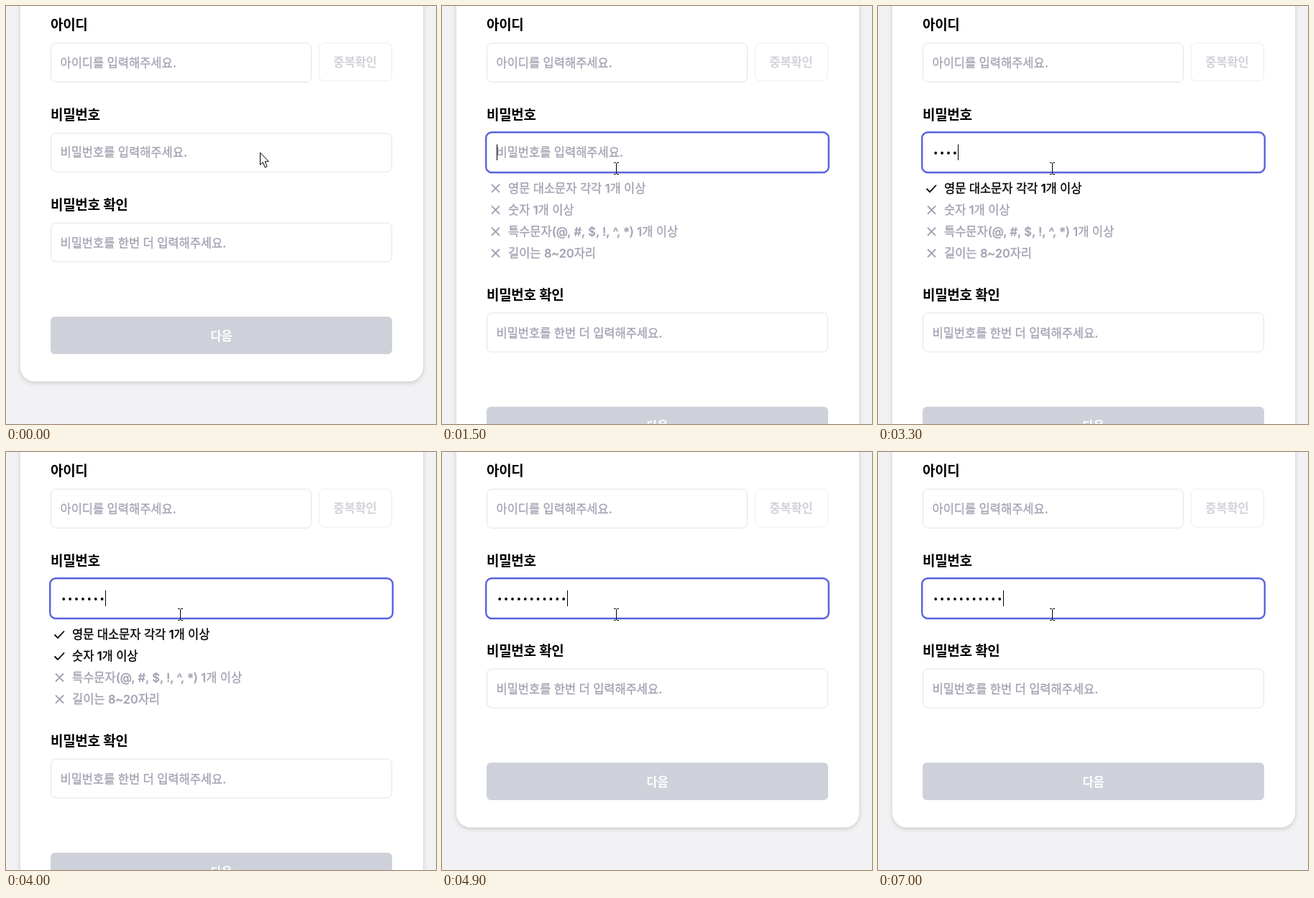
Animation, 598 px wide and 580 px high, one loop 7.3 s. Source, as an HTML page:

```html
<!DOCTYPE html>
<html lang="ko">
<head>
<meta charset="utf-8">
<style>
  html, body { margin: 0; width: 100%; height: 100%; overflow: hidden; background: #f2f2f4; }
  svg { display: block; width: 598px; height: 580px; }
  text { font: 500 16.5px Inter, "Noto Sans CJK KR", "Noto Sans CJK", sans-serif; }
  .label { font-size: 19px; font-weight: 600; letter-spacing: -.016em; }
  .hint { fill: #a2a1b2; stroke: #a2a1b2; stroke-width: .3; }
  .field { fill: #fff; stroke: #e2e3e8; }
  .button { font-weight: 600; text-anchor: middle; letter-spacing: -.005em; }
  .rule { color: #a2a1b2; }
  .rule.done { color: #000; }
  .rule text { fill: currentColor; stroke: currentColor; stroke-width: .35; }
  .rule path { fill: none; stroke: currentColor; stroke-width: 1.8; }
  .card { filter: drop-shadow(0 2px 3px #0000002b); }
</style>
</head>
<body>
<svg viewBox="0 0 598 580">
  <rect class="card" id="card" x="20" y="-60" width="560" height="581" rx="20" fill="#fff"/>

  <text class="label" x="62" y="33">아이디</text>
  <rect class="field" x="62.5" y="51.5" width="362" height="54" rx="7"/>
  <text class="hint" x="75.5" y="85">아이디를 입력해주세요.</text>
  <rect class="field" x="435.5" y="51.5" width="101" height="52.5" rx="7" style="stroke:#eeeef1"/>
  <text class="button" x="485.5" y="84" fill="#d2d2da">중복확인</text>

  <text class="label" x="62" y="158">비밀번호</text>
  <rect class="field" x="62.5" y="176.5" width="474" height="53.5" rx="7"/>
  <rect id="ring" x="61.2" y="175.2" width="476.6" height="55.8" rx="8" fill="#fff" stroke="#5a63de" stroke-width="2.4"/>
  <text class="hint" id="passwordHint" x="75.5" y="209">비밀번호를 입력해주세요.</text>
  <g id="dots"></g>
  <rect id="caret" y="192" width="1" height="22"/>

  <g id="rules"></g>

  <g id="lower">
    <text class="label" x="62" y="282.5">비밀번호 확인</text>
    <rect class="field" x="62.5" y="301" width="474" height="54" rx="7"/>
    <text class="hint" x="75.5" y="334.5">비밀번호를 한번 더 입력해주세요.</text>
    <rect x="62" y="431" width="475" height="52" rx="6" fill="#cfd1da"/>
    <text class="button" x="299.5" y="463.5" fill="#fff">다음</text>
  </g>

  <path id="arrow" d="M.5.5V17.5L4.3 13.8L7.2 21L10 19.8L7.1 12.8H12.3Z" fill="#fff" stroke="#000"/>
  <path id="beam" d="M-3.5-8H-1L0-7L1-8H3.5M0-7V7M-3.5 8H-1L0 7L1 8H3.5" fill="none" stroke="#000"/>
</svg>
<script>
const LOOP = 7300, TICK = 100;
const FOCUS = 1500, VALID = 4900, LIST_HEIGHT = 125;
const CROSS = "M69 -5.5l11 11m0 -11l-11 11", CHECK = "M67.5 .5l4.5 4.5l9 -9.5";

const RULES = [
  ["영문 대소문자 각각 1개 이상", 2800],
  ["숫자 1개 이상", 3600],
  ["특수문자(@, #, $, !, ^, *) 1개 이상", VALID],
  ["길이는 8~20자리", 4100],
];
// [time, characters typed]
const TYPING = [[2400, 1], [2800, 2], [3100, 3], [3300, 4], [3600, 5], [3800, 6],
  [4000, 7], [4100, 8], [4300, 10], [VALID, 11]];
const CARET_OFF = [[2200, 2400], [5100, 5700], [6300, 7000]];
// [time, x, y, shape]
const POINTER = [
  [0, 353, 203, "arrow"], [100, 360, 120, "arrow"], [200, 250, 25, "arrow"],
  [300, 110, 80, "beam"], [400, 79, 205, "beam"], [500, 170, 327, "beam"],
  [600, 300, 159, "arrow"], [1200, 285, 180, "beam"], [1300, 258, 208, "beam"],
  [1400, 242.5, 225.5, "beam"],
];

const el = id => document.getElementById(id);
const show = (node, on) => { node.style.display = on ? "" : "none"; };
const latest = (steps, t) => steps.filter(step => step[0] <= t).pop();
const add = (parent, tag, attributes) => {
  const node = document.createElementNS("http://www.w3.org/2000/svg", tag);
  for (const name in attributes) node.setAttribute(name, attributes[name]);
  return parent.appendChild(node);
};

const dots = Array.from({ length: 11 }, (_, i) =>
  add(el("dots"), "circle", { cx: 80.2 + 8.9 * i, cy: 204, r: 1.9 }));

const rules = RULES.map(([label, doneAt], i) => {
  const row = add(el("rules"), "g", { transform: `translate(0 ${253 + 30 * i})` });
  const icon = add(row, "path", {});
  add(row, "text", { x: 92, y: 6 }).textContent = label;
  return { row, icon, doneAt };
});

function draw(t) {
  const focused = t >= FOCUS, open = focused && t < VALID;
  const typed = (latest(TYPING, t) || [0, 0])[1];
  const shift = open ? LIST_HEIGHT : 0;

  el("card").setAttribute("height", 581 + shift);
  el("lower").setAttribute("transform", `translate(0 ${shift})`);
  show(el("ring"), focused);
  show(el("rules"), open);
  show(el("passwordHint"), !typed);

  dots.forEach((dot, i) => show(dot, i < typed));
  el("caret").setAttribute("x", Math.floor(76.2 + 8.9 * typed));
  show(el("caret"), focused && !CARET_OFF.some(([from, to]) => t >= from && t < to));

  for (const { row, icon, doneAt } of rules) {
    const done = t >= doneAt;
    row.setAttribute("class", done ? "rule done" : "rule");
    icon.setAttribute("d", done ? CHECK : CROSS);
  }

  const [, x, y, shape] = latest(POINTER, t);
  for (const name of ["arrow", "beam"]) {
    show(el(name), name === shape);
    el(name).setAttribute("transform", `translate(${x} ${y})`);
  }
}

const start = performance.now();
function frame() {
  const t = (performance.now() - start) % LOOP;
  draw(Math.floor(t / TICK) * TICK);
  requestAnimationFrame(frame);
}
frame();
</script>
</body>
</html>
```
